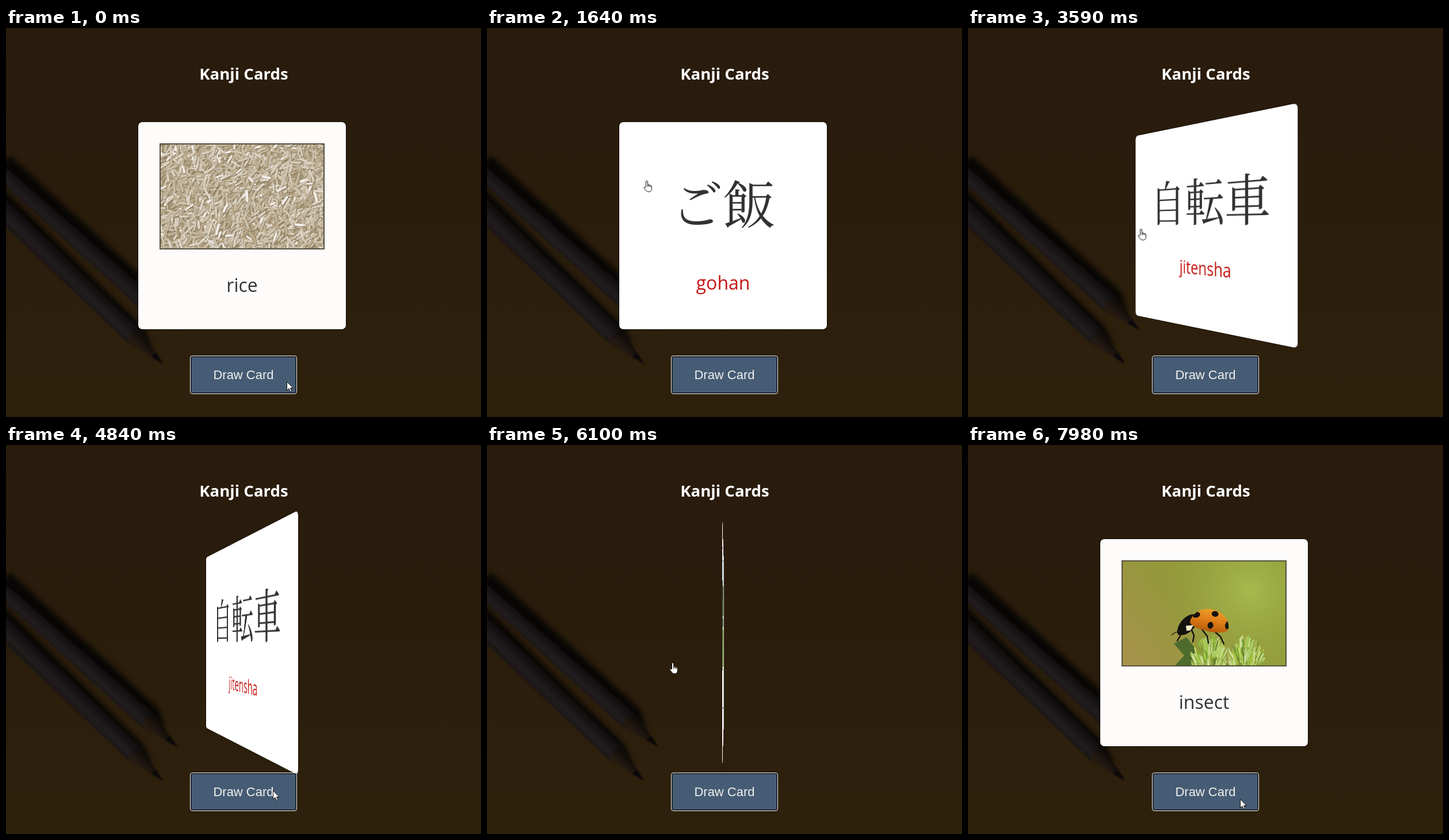
Write an HTML page with a canvas that moves like this. It is 826 px wide and 678 px high and loops after 8000 ms.

```html
<!DOCTYPE html>
<html lang="en">
<head>
<meta charset="utf-8">
<title>Kanji Cards</title>
<style>
html, body { margin: 0; width: 100%; height: 100%; overflow: hidden; background: #2b1e0c; }
#stage { position: relative; width: 826px; height: 678px; overflow: hidden; }
#stage > * { position: absolute; }
#desk, #chrome { left: 0; top: 0; }
#scene { left: 230px; top: 164px; width: 361px; height: 361px; perspective: 752px; }
#card { width: 100%; height: 100%; transform-style: preserve-3d; }
.face { position: absolute; inset: 0; border-radius: 7px; background: #fdfcfb;
  box-shadow: 0 0 3px rgba(0, 0, 0, .85); backface-visibility: hidden; }
.face svg { position: absolute; left: 0; top: 0; overflow: visible; }
.back { background: #fff; transform: rotateY(180deg); }
#photo { position: absolute; left: 37px; top: 37px; border: 2px solid #56503f; }
text { text-anchor: middle; font-family: "Open Sans", "Noto Sans", sans-serif; }
#word, #reading { font-size: 32px; }
#word { fill: #343135; }
#reading { fill: #c51512; }
#kanji { font: 200 90px "Noto Serif CJK JP", "Noto Sans CJK JP", "Noto Sans CJK", serif; fill: #343135; }
#title { font-size: 27.6px; font-weight: 700; fill: #fff; }
#label { font: 22px "Liberation Sans", Arial, sans-serif; fill: #f0f0ee; }
#cursor { left: 0; top: 0; overflow: visible; }
#cursor path { fill: #fff; stroke: #111; stroke-linejoin: round; }
</style>
</head>
<body>
<div id="stage">
  <canvas id="desk" width="826" height="678"></canvas>
  <div id="scene">
    <div id="card">
      <div class="face">
        <canvas id="photo" width="283" height="181"></canvas>
        <svg width="361" height="361"><text id="word" x="180.5" y="295.5"></text></svg>
      </div>
      <div class="face back">
        <svg width="361" height="361">
          <text id="kanji" x="180.5" y="177"></text>
          <text id="reading" x="180.5" y="292"></text>
        </svg>
      </div>
    </div>
  </div>
  <svg id="chrome" width="826" height="678">
    <text id="title" x="413.5" y="89.5">Kanji Cards</text>
    <rect x="320.5" y="571.5" width="185" height="66" rx="3.5" fill="#0c0c0d" stroke="#fff"/>
    <rect x="322.5" y="573.5" width="181" height="62" rx="1.5" fill="#465c74"/>
    <text id="label" x="413" y="611.5">Draw Card</text>
  </svg>
  <svg id="cursor" width="24" height="24">
    <path id="arrow" d="M.5.5V15.6L4 12.4 6.3 17.6 8.7 16.5 6.4 11.5H11.2Z"/>
    <path id="hand" d="M-1.5 11V2a1.5 1.5 0 0 1 3 0V7q2-1 2.4 1 2-1 2.4 1 2-1 2 1V14q0 5-4 5.5H1.5Q-1 19-5 12.5q0-3 3.5 0M1.5 7V11M3.9 8V11M6.3 9V11"/>
  </svg>
</div>
<script>
const $ = id => document.getElementById(id);
const clamp = v => Math.max(0, Math.min(1, v));
const smooth = v => (v = clamp(v), v * v * (3 - 2 * v));
const easeOut = v => 1 - (1 - clamp(v)) ** 2;

function random(seed) {
  return (lo = 0, hi = 1) => lo + (hi - lo) * (seed = (seed * 16807) % 2147483647) / 2147483647;
}

function gradient(c, x0, y0, x1, y1, ...colors) {
  const g = c.createLinearGradient(x0, y0, x1, y1);
  colors.forEach((k, i) => g.addColorStop(i / (colors.length - 1), k));
  return g;
}

function trace(c, p) {
  c.beginPath();
  for (let i = 0; i < p.length; i += 2) c.lineTo(p[i], p[i + 1]);
}

function poly(c, color, ...p) {
  c.fillStyle = color;
  trace(c, p);
  c.fill();
}

function line(c, color, width, ...p) {
  c.strokeStyle = color;
  c.lineWidth = width;
  trace(c, p);
  c.stroke();
}

function oval(c, color, x, y, rx, ry = rx, turn = 0) {
  c.fillStyle = color;
  c.beginPath();
  c.ellipse(x, y, rx, ry, turn, 0, 7);
  c.fill();
}

function ring(c, color, width, x, y, r) {
  c.strokeStyle = color;
  c.lineWidth = width;
  c.beginPath();
  c.arc(x, y, r, 0, 7);
  c.stroke();
}

function rect(c, color, x, y, w, h) {
  c.fillStyle = color;
  c.fillRect(x, y, w, h);
}

// x, y is the tip; half widths at the far end and at the shoulder
function pencil(c, x, y, turn, far, near, shade) {
  const neck = -68, end = -420;
  c.save();
  c.translate(x, y);
  c.rotate(turn);
  c.filter = 'blur(5px)';
  poly(c, '#080604', end, 0, end, -far - shade, neck, -near - shade * .6, neck / 2, -near / 2, neck, 0);
  c.filter = 'blur(.8px)';
  poly(c, gradient(c, 0, -near, 0, near, '#0e0c0c', '#171415', '#211d1e', '#1b1616'),
    end, -far, neck, -near, neck, near, end, far);
  poly(c, gradient(c, 0, -near / 2, 0, near / 2, '#120d0a', '#251a12'),
    neck, -near, 0, 0, neck, near, neck - 8, 0);
  poly(c, '#0b090a', neck / 3, -near / 3, 0, 0, neck / 3, near / 3);
  c.restore();
}

function drawDesk() {
  const c = $('desk').getContext('2d');
  rect(c, gradient(c, 0, 0, 0, 678, '#291c0d', '#2a1d0c', '#2e210c'), 0, 0, 826, 678);
  pencil(c, 298, 526, .73, 12, 16, 20);
  pencil(c, 273, 585, .765, 18, 16, 10);
}

// pictures fill a 283 by 181 box
function drawRice(c) {
  const rnd = random(77);
  rect(c, '#a39475', 0, 0, 283, 181);
  c.lineCap = 'round';
  for (let i = 0; i < 1900; i++) {
    const x = rnd(-6, 290), y = rnd(-6, 188);
    const a = -1 + rnd(-1) + rnd(-1), n = rnd(5, 9), k = rnd(), w = rnd(2.8, 4.2);
    const dx = Math.cos(a) * n, dy = Math.sin(a) * n;
    line(c, 'rgba(112,96,68,.5)', w, x - dx + 1, y - dy + 1, x + dx + 1, y + dy + 1);
    line(c, `hsl(38,25%,${k > .94 ? 93 : 62 + k * 23}%)`, w, x - dx, y - dy, x + dx, y + dy);
  }
}

function drawBicycle(c) {
  const rnd = random(12);
  rect(c, gradient(c, 0, 0, 283, 181, '#dfdfe0', '#e6e4e3', '#dcdad9'), 0, 0, 283, 181);
  for (let i = 0; i < 260; i++)
    rect(c, i % 2 ? 'rgba(255,255,255,.5)' : 'rgba(180,176,174,.28)',
      rnd(0, 283), 5 * Math.floor(rnd(0, 32)), rnd(3, 12), 2);
  line(c, '#a6a29f', 2, 0, 60, 79, 60, 79, 0);
  // kerb and pavement
  for (let x = 0; x < 283; x += 9) rect(c, x % 2 ? '#a0928a' : '#88756e', x, 162, 9, 9);
  rect(c, '#bdb6b2', 0, 171, 283, 10);
  oval(c, '#3f3835', 58, 170, 10, 3);
  oval(c, '#43403f', 280, 142, 3, 8);
  for (const x of [107, 179]) {
    for (let a = 0; a < 3; a += .52) {
      const dx = Math.cos(a) * 21, dy = Math.sin(a) * 21;
      line(c, 'rgba(130,125,125,.4)', .6, x - dx, 152 - dy, x + dx, 152 + dy);
    }
    ring(c, '#f4924a', 4.4, x, 152, 22);
    oval(c, '#333', x, 152, 2);
  }
  const steel = '#66758f', dark = '#222';
  line(c, steel, 2.2, 127, 116, 138, 154, 166, 121, 131, 122, 107, 152, 138, 154);
  line(c, steel, 2.4, 164, 114, 168, 126, 179, 152);
  c.lineCap = 'round';
  line(c, dark, 3, 119, 112, 125, 114, 134, 112);
  line(c, dark, 2.4, 163, 115, 167, 110, 172, 109, 175, 113);
  line(c, dark, 2, 137, 154, 143, 170);
  ring(c, dark, 2.2, 137, 154, 6);
  oval(c, dark, 137, 154, 3);
}

function drawHouse(c) {
  const rnd = random(31);
  rect(c, gradient(c, 0, 0, 0, 97, '#d3e0e8', '#f0f2f0'), 0, 0, 283, 181);
  for (let i = 0; i < 150; i++)
    oval(c, `hsl(95,32%,${rnd(22, 38)}%)`, rnd(0, 283), rnd(59, 109), rnd(6, 15));
  rect(c, '#e9e6de', 61, 87, 162, 38);
  poly(c, '#46403b', 49, 95, 89, 43, 195, 43, 235, 95);
  for (let x = 77; x < 200; x += 28) rect(c, '#56646c', x, 100, 16, 14);
  rect(c, gradient(c, 0, 119, 0, 181, '#5f8238', '#789c48'), 0, 119, 283, 62);
}

function drawInsect(c) {
  const rnd = random(5), ink = '#15130f';
  rect(c, gradient(c, 0, 181, 231, 0, '#a8924c', '#95983c', '#90a138'), 0, 0, 283, 181);
  const glow = c.createRadialGradient(221, 50, 5, 221, 57, 150);
  glow.addColorStop(0, 'rgba(168,186,80,.9)');
  glow.addColorStop(1, 'rgba(150,160,65,0)');
  rect(c, glow, 0, 0, 283, 181);
  // plant
  poly(c, '#4d6b2c', 89, 143, 111, 132, 125, 150, 125, 181, 91, 181, 107, 164);
  c.lineCap = 'round';
  for (const x of [151, 214])
    for (let i = 0; i < 200; i++) {
      const u = rnd(-1), y = rnd(135, 185) + u * u * 26;
      line(c, `hsl(${rnd(68, 84)},${rnd(42, 62)}%,${rnd(34, 76)}%)`, rnd(1.2, 3),
        x + u * 24, y + 8, x + u * 32 + rnd(-2, 2), y - 7);
    }
  // legs
  for (let i = 0; i < 4; i++) {
    const x = 101 + i * 17;
    line(c, ink, 2.4, x, 115, x + i * 6, 128 + i, x + i * 10 - 6, 138 + i * 2);
  }
  line(c, ink, 1.2, 102, 121, 91, 124, 85, 128);
  // head and shell
  oval(c, ink, 113, 110, 12, 22, .75);
  oval(c, ink, 101, 120, 6, 9, .3);
  c.save();
  c.translate(152, 104);
  c.rotate(.2);
  c.beginPath();
  c.ellipse(0, 8, 34, 29, 0, Math.PI, 0);
  c.ellipse(0, 8, 34, 10, 0, 0, Math.PI);
  c.clip();
  rect(c, gradient(c, 0, -22, 0, 18, '#eaa02d', '#e17f17', '#b65a0d'), -40, -30, 80, 60);
  oval(c, ink, -26, -6, 7, 5, -.4);
  oval(c, ink, 6, -14, 6, 5);
  oval(c, ink, 2, 7, 5, 6);
  oval(c, ink, 31, 1, 4, 7);
  c.restore();
  poly(c, '#f2eccb', 110, 112, 123, 111, 118, 120, 111, 121);
}

// lift raises the text on the back
const cards = [
  { from: 0, word: 'rice', kanji: 'ご飯', reading: 'gohan', lift: 0, draw: drawRice },
  { from: 2490, word: 'bicycle', kanji: '自転車', reading: 'jitensha', lift: 25, draw: drawBicycle },
  { from: 5170, word: 'house', kanji: '家', reading: 'ie', lift: 0, draw: drawHouse },
  { from: 7820, word: 'insect', kanji: '虫', reading: 'mushi', lift: 0, draw: drawInsect }
];

// pointer trips; wait is the delay before the card turns back
const trips = [
  { at: 630, to: [278, 266], over: true },
  { at: 1640, to: [472, 614], wait: 306 },
  { at: 3270, to: [301, 350], over: true },
  { at: 4450, to: [464, 602], wait: 228 },
  { at: 5870, to: [316, 368], over: true },
  { at: 7040, to: [473, 617], wait: 190 }
];
const STEP = 78.1, TURN = 400;

function pose(t) {
  let x = 488, y = 616, angle = 0;
  for (const { at, to, over, wait = 35 } of trips) {
    if (t < at) break;
    const s = STEP * Math.floor((t - at + 12) / STEP);
    const go = over ? easeOut((s + 70) / 390) : smooth((s - wait + 250) / 420);
    const turn = smooth((s - wait) / TURN);
    x += (to[0] - x) * go;
    y += (to[1] - y) * go;
    angle = 180 * (over ? turn : 1 - turn);
  }
  return { x, y, angle };
}

let shown;
function show(card) {
  if (card === shown) return;
  shown = card;
  for (const id of ['word', 'kanji', 'reading']) $(id).textContent = card[id];
  $('kanji').setAttribute('y', 177 - card.lift / 5);
  $('reading').setAttribute('y', 292 - card.lift);
  const c = $('photo').getContext('2d');
  c.save();
  card.draw(c);
  c.restore();
}

let start;
function frame(now) {
  start ??= now;
  const t = (now - start) % 8000;
  const { x, y, angle } = pose(t);
  show(cards.findLast(k => t >= k.from));
  $('card').style.transform = `rotateY(${angle}deg)`;
  const over = y < 525;
  $('hand').style.display = over ? '' : 'none';
  $('arrow').style.display = over ? 'none' : '';
  $('cursor').style.transform = `translate(${Math.round(x)}px, ${Math.round(y)}px)`;
  requestAnimationFrame(frame);
}

drawDesk();
requestAnimationFrame(frame);
</script>
</body>
</html>
```
